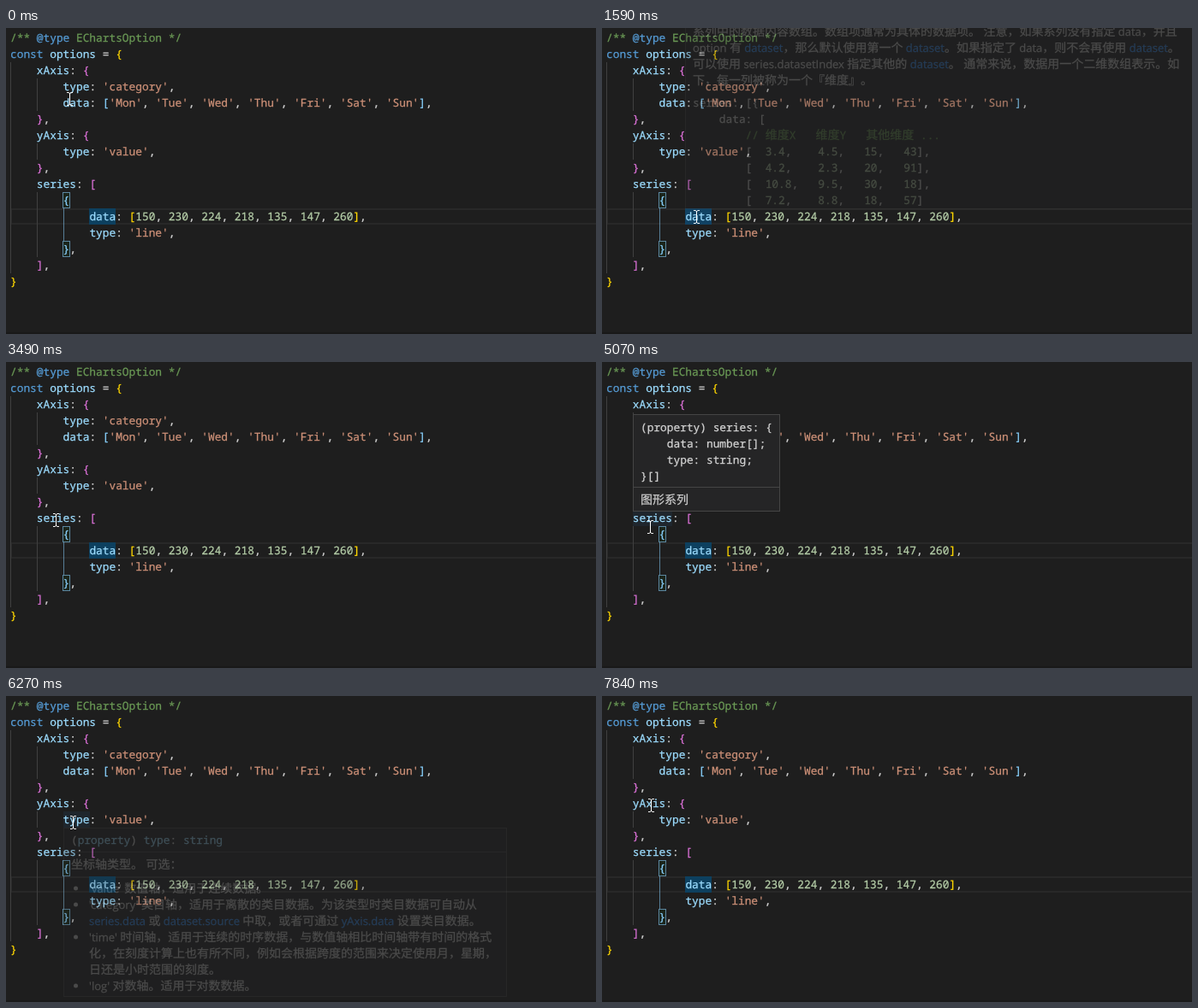
Write an HTML page that moves like this. It is 689x358 px and loops after 8 s.

```html
<!DOCTYPE html>
<html lang="en">
<head>
<meta charset="utf-8">
<title>Editor hover hints</title>
<style>
  html, body { margin: 0; width: 100%; height: 100%; overflow: hidden; background: #1e1e1e; }
  svg { display: block; width: 689px; height: 358px; }
  text {
    white-space: pre; text-rendering: geometricPrecision; text-spacing-trim: space-all;
    color: #d4d4d4; fill: currentColor; stroke: currentColor; stroke-width: .25px;
  }
  .mono { font: 12.83px "Noto Sans Mono", "Noto Sans CJK SC", monospace; }
  .sans { font: 13px "Open Sans", "Noto Sans CJK SC", sans-serif; color: #ccc; }
  .cjk { font-size: 14px; }
  .link { color: #3794ff; }
  .comment { color: #6a9955; }
  .keyword { color: #569cd6; }
  .prop { color: #9cdcfe; }
  .string { color: #ce9178; }
  .number { color: #b5cea8; }
  .b0 { color: #ffd700; }
  .b1 { color: #da70d6; }
  .b2 { color: #87cefa; }
  .guide { fill: #404040; }
  .active { fill: #87cefa; fill-opacity: .55; }
  .match { fill: #006400; fill-opacity: .1; stroke: #87cefa; stroke-opacity: .6; }
  .line { fill: none; stroke: #282828; stroke-width: 2; }
  .word { fill: #0d405f; }
  .hover { fill: #264f78; fill-opacity: .17; }
  .panel { fill: #252526; stroke: #454545; }
  .rule { fill: #454545; }
  .dot { fill: #ccc; }
  .edge { fill: #191919; }
</style>
</head>
<body>
<svg id="stage" viewBox="0 0 689 358"></svg>
<script>
const CODE = `/** @type EChartsOption */
const options = {
    xAxis: {
        type: 'category',
        data: ['Mon', 'Tue', 'Wed', 'Thu', 'Fri', 'Sat', 'Sun'],
    },
    yAxis: {
        type: 'value',
    },
    series: [
        {
            data: [150, 230, 224, 218, 135, 147, 260],
            type: 'line',
        },
    ],
}`.split('\n');

const SAMPLE = `series: [{
    data: [
        // 维度X   维度Y   其他维度 ...
        [  3.4,    4.5,   15,   43],
        [  4.2,    2.3,   20,   91],
        [  10.8,   9.5,   30,   18],
        [  7.2,    8.8,   18,   57]`.split('\n');

const LINE = 19;
const rowTop = row => 2 + LINE * row;
const colX = col => Math.round(5 + 7.7 * col);

const span = (cls, s) => `<tspan class="${cls}">${s}</tspan>`;
const rect = (cls, x, y, w, h) =>
  `<rect class="${cls}" x="${x}" y="${y}" width="${w}" height="${h}"/>`;
const sizeCjk = s => s.replace(/[\u2e80-\uffef]+/g, run => span('cjk', run));
const text = (cls, x, y, ...list) => list.map((s, i) =>
  `<text class="${cls}" x="${x}" y="${y + i * LINE}">${sizeCjk(s)}</text>`).join('');

// Syntax colours; bracket colours follow the nesting depth.
let depth = 0;
function paint(line) {
  if (line.startsWith('/**')) {
    return span('comment', line.replace('@type', s => span('keyword', s)));
  }
  return line.replace(/'\w+'|\w+|[[{\]}]/g, s => {
    if (s[0] === "'") return span('string', s);
    if (/\d/.test(s)) return span('number', s);
    if (s === 'const') return span('keyword', s);
    if (/\w/.test(s)) return span('prop', s);
    return span('b' + (/[[{]/.test(s) ? depth++ : --depth) % 3, s);
  });
}

const paintSample = line => line.includes('//')
  ? span('comment', line)
  : line.replace(/[\d.]+/g, s => span('number', s));

// Words in braces become links.
const prose = (x, y, ...list) =>
  text('sans', x, y, ...list.map(s => s.replace(/\{(.+?)\}/g, (_, w) => span('link', w))));

const wordBox = (cls, col, row, length) =>
  rect(cls, colX(col), rowTop(row), Math.round(7.7 * length), LINE);
const guide = (cls, col, from, to) =>
  rect(cls, colX(col), rowTop(from), 1, LINE * (to - from + 1));
const matchBox = row => rect('match', colX(8) - .5, rowTop(row) + .5, 8, LINE - 1);

const editor = () =>
  rect('line', 6, rowTop(11) + 1, 700, LINE - 2) +
  guide('guide', 0, 2, 14) +
  guide('guide', 4, 3, 4) + guide('guide', 4, 7, 7) + guide('guide', 4, 10, 13) +
  guide('active', 8, 11, 12) +
  wordBox('word', 12, 11, 4) +
  matchBox(10) + matchBox(13);

const dataHint = () =>
  rect('panel', 97.5, -20.5, 620, 232) +
  prose(106, 9,
    '系列中的数据内容数组。数组项通常为具体的数据项。 注意，如果系列没有指定 data，并且',
    'option 有 {dataset}，那么默认使用第一个 {dataset}。如果指定了 data，则不会再使用 {dataset}。',
    '可以使用 series.datasetIndex 指定其他的 {dataset}。 通常来说，数据用一个二维数组表示。如',
    '下，每一列被称为一个『维度』。') +
  text('mono', 106, 92, ...SAMPLE.map(paintSample));

const seriesHint = () =>
  rect('panel', 36.5, 61.5, 171, 113) +
  text('mono', 45, 81,
    '(property) series: {', '    data: number[];', '    type: string;', '}[]') +
  rect('rule', 37, 146, 170, 1) +
  prose(45, 166, '图形系列');

const typeHint = () =>
  rect('panel', 67.5, 154.5, 517, 197) +
  text('mono', 76, 173, '(property) type: string'.replace(/\w+/g, s => span('prop', s))) +
  rect('rule', 68, 182, 516, 1) +
  prose(76, 202, '坐标轴类型。 可选：') +
  [0, 1, 3, 6].map(i => `<circle class="dot" cx="81.5" cy="${225 + i * LINE}" r="2.5"/>`).join('') +
  prose(97, 230,
    "'value' 数值轴，适用于连续数据。",
    "'category' 类目轴，适用于离散的类目数据。为该类型时类目数据可自动从",
    '{series.data} 或 {dataset.source} 中取，或者可通过 {yAxis.data} 设置类目数据。',
    "'time' 时间轴，适用于连续的时序数据，与数值轴相比时间轴带有时间的格式",
    '化，在刻度计算上也有所不同，例如会根据跨度的范围来决定使用月，星期，',
    '日还是小时范围的刻度。',
    "'log' 对数轴。适用于对数数据。");

const STEP = 130;        // time between visible changes
const FADE = .25;        // opacity of a hint during its first step
const HINTS = [
  { draw: dataHint, col: 12, row: 11, length: 4, start: 1590, end: 2920 },
  { draw: seriesHint, col: 4, row: 9, length: 6, start: 3740, end: 5220 },
  { draw: typeHint, col: 8, row: 7, length: 4, start: 6270, end: 7720 },
];

// Pointer moves: begin, arrive, x, y. It rests in between.
const MOVES = [
  [0, 240, 48, 90], [240, 360, 51, 67], [360, 750, 91, 220],
  [750, 1020, 103, 256], [1020, 1170, 108, 225], [1170, 1470, 110, 221],
  [2640, 2770, 102, 221], [2770, 3070, 76, 223], [3070, 3490, 58, 185],
  [4940, 5070, 56, 193],
  [5530, 5660, 66, 161], [5660, 5960, 78, 148],
  [7420, 7840, 57, 128],
];

function pointerAt(t) {
  let x = 74, y = 83;
  for (const [begin, arrive, toX, toY] of MOVES) {
    if (t < begin) break;
    const hops = Math.round((arrive - begin) / STEP);
    const p = Math.min(1, Math.floor((t - begin) / (arrive - begin) * hops) / hops);
    x += (toX - x) * p;
    y += (toY - y) * p;
  }
  return [Math.round(x), Math.round(y)];
}

const stage = document.getElementById('stage');
stage.innerHTML =
  rect('edge', 0, 356, 689, 2) +
  editor() +
  HINTS.map(h => wordBox('hover', h.col, h.row, h.length)).join('') +
  text('mono', 5, rowTop(0) + 14, ...CODE.map(paint)) +
  HINTS.map(h => `<g class="hint">${h.draw()}</g>`).join('') +
  `<path id="pointer" fill="none" stroke="#fff"
    d="M-3 -7.5H-1L.5 -6.5L2 -7.5H4M.5 -7V7M-3 7.5H-1L.5 6.5L2 7.5H4"/>`;

const words = stage.querySelectorAll('.hover');
const hints = stage.querySelectorAll('.hint');
const pointer = document.getElementById('pointer');

function render(t) {
  HINTS.forEach(({ start, end }, i) => {
    const open = t >= start && t < end;
    words[i].style.opacity = open ? 1 : 0;
    hints[i].style.opacity = !open ? 0 : t < start + STEP ? FADE : 1;
  });
  pointer.setAttribute('transform', `translate(${pointerAt(t)})`);
}

const begin = performance.now();
function tick() {
  render((performance.now() - begin) % 8000);
  requestAnimationFrame(tick);
}
tick();
</script>
</body>
</html>
```
